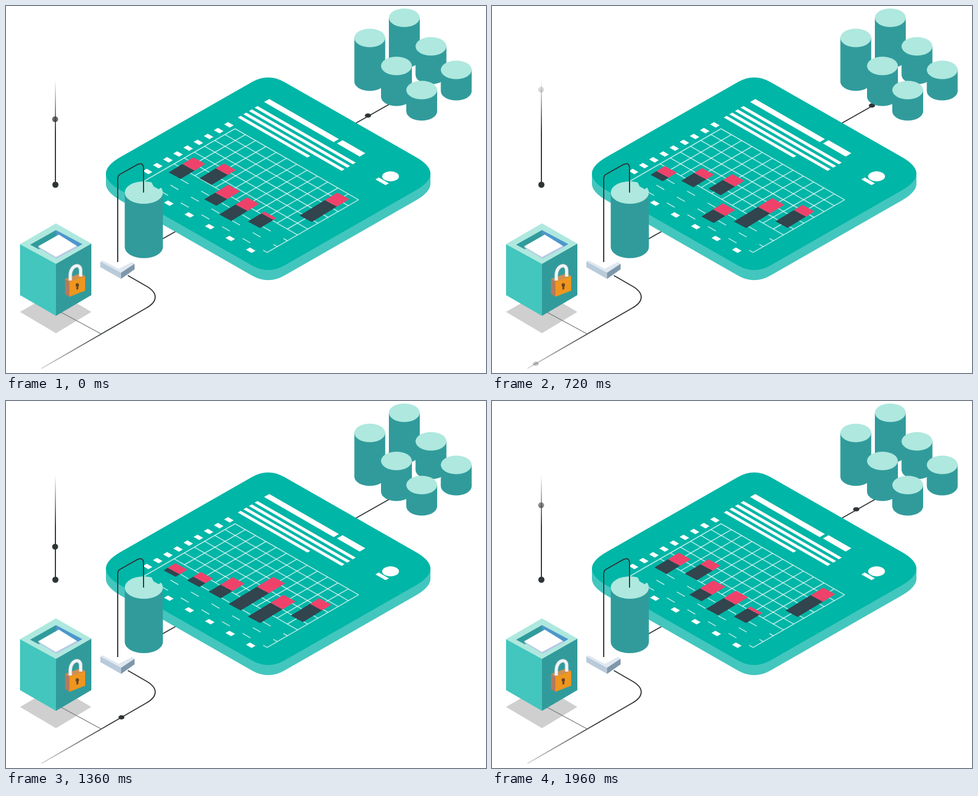
Recreate the animation shown at these times as an HTML page with a canvas. Size 855 px wide and 655 px high, loop 2000 ms.

```html
<!DOCTYPE html>
<html lang="en">
<head>
<meta charset="utf-8">
<title>Isometric data flow</title>
<style>
html, body { margin: 0; width: 100%; height: 100%; overflow: hidden; background: #fff; }
canvas { display: block; }
</style>
</head>
<body>
<canvas id="stage" width="855" height="655"></canvas>
<script>
const ctx = document.getElementById('stage').getContext('2d');
const LOOP = 2000, STEP = 40, K = 0.577;
const TEAL = '#00b6a7', MID = '#43c6be', DEEP = '#319b9c', PALE = '#aee8de';
const INK = '#2f3436', SLATE = '#32444d', PINK = '#ef426b';

function poly(fill, ...p) {
  ctx.beginPath();
  for (let i = 0; i < p.length; i += 2) ctx.lineTo(p[i], p[i + 1]);
  ctx.closePath();
  ctx.fillStyle = fill;
  ctx.fill();
}

function line(color, width, ...p) {
  ctx.beginPath();
  for (let i = 0; i < p.length; i += 2) ctx.lineTo(p[i], p[i + 1]);
  stroke(color, width);
}

function stroke(color, width) {
  ctx.strokeStyle = color;
  ctx.lineWidth = width;
  ctx.stroke();
}

function oval(fill, x, y, rx, ry) {
  ctx.beginPath();
  ctx.ellipse(x, y, rx, ry, 0, 0, 7);
  ctx.fillStyle = fill;
  ctx.fill();
}

// Parallelogram from its upper corner: u runs down-right, v down-left.
function tile(fill, x, y, u, v, ku = K, kv = K) {
  poly(fill, x, y, x + u, y + u * ku, x + u - v, y + u * ku + v * kv, x - v, y + v * kv);
}

function fade(x0, y0, a0, x1, y1) {
  const g = ctx.createLinearGradient(x0, y0, x1, y1);
  g.addColorStop(0, `rgba(47,52,54,${a0})`);
  g.addColorStop(1, INK);
  return g;
}

const dropInk = fade(88, 132, 0, 88, 225);
const pathInk = fade(63, 647, 0.2, 185, 577);

function cylinder(x, top, bottom, rx, ry) {
  ctx.beginPath();
  ctx.moveTo(x - rx, top);
  ctx.lineTo(x - rx, bottom);
  ctx.ellipse(x, bottom, rx, ry, 0, Math.PI, 0, true);
  ctx.lineTo(x + rx, top);
  ctx.fillStyle = DEEP;
  ctx.fill();
  oval(PALE, x, top, rx, ry);
}

function slabFace(fill, cy) {
  const cx = 467, w = 315, k = 0.572, h = w * k, d = 29, e = 52;
  ctx.beginPath();
  ctx.moveTo(cx - d, cy - h + d * k);
  ctx.quadraticCurveTo(cx, cy - h, cx + d, cy - h + d * k);
  ctx.lineTo(cx + w - e, cy - e * k);
  ctx.quadraticCurveTo(cx + w, cy, cx + w - e, cy + e * k);
  ctx.lineTo(cx + d, cy + h - d * k);
  ctx.quadraticCurveTo(cx, cy + h, cx - d, cy + h - d * k);
  ctx.lineTo(cx - w + e, cy + e * k);
  ctx.quadraticCurveTo(cx - w, cy, cx - w + e, cy - e * k);
  ctx.closePath();
  ctx.fillStyle = fill;
  ctx.fill();
}

const GX = 408, GY = 219, CU = 18.33, CV = 18.1;
const gx = (u, v) => GX + u - v;
const gy = (u, v) => GY + (u + v) * K;

function gridLine(u0, v0, u1, v1) {
  line('rgba(255,255,255,.75)', 1.5, gx(u0, v0), gy(u0, v0), gx(u1, v1), gy(u1, v1));
}

function slab() {
  for (let z = 18; z > 0; z -= 2) slabFace(MID, 299.3 + z);
  slabFace(TEAL, 299.3);

  tile('#fff', 469, 166, 124, 9.3);
  tile('#fff', 599.5, 239.5, 40.5, 10);
  for (let i = 0; i < 4; i++) tile('#fff', 448 - i * 10, 178.6 + i * 5.8, i < 3 ? 175 : 124, 5.2);
  oval('#fff', 685, 304, 15, 9);
  tile('#fff', 664, 306, 18, 6);

  for (let i = 0; i < 9; i++) tile('#fff', 395.5 - i * 18.1, 207.2 + i * 10.4, 10, 7);
  for (let i = 0; i < 5; i++) tile('#fff', 288.5 + i * 36.5, 347 + i * 21, 10, 7);

  const W = 12 * CU, H = 9 * CV;
  for (let r = 0; r <= 6; r++) gridLine(0, r * CV, W, r * CV);
  for (let c = 0; c <= 12; c++) gridLine(c * CU, 0, c * CU, c % 12 ? 6 * CV : H);
  for (let r = 7; r <= 9; r++) {
    for (let c = 2; c <= 12; c += 2) gridLine(c * CU - 7, r * CV, Math.min(W, c * CU + 7), r * CV);
  }
}

// Each edge of a bar swings as [middle x, swing], widest at the peak time.
const bars = [
  { peak: 100, foot: [284.5, 5.5], split: [299, 16], head: [315, 19.5] },
  { peak: 260, foot: [335.5, 13.5], split: [357, 24.5], head: [371, 25] },
  { peak: 760, foot: [367, 19], split: [389, 22.5], head: [409.5, 19] },
  { peak: 1440, foot: [382.5, 14.5], split: [415, 33], head: [437, 40] },
  { peak: 1000, foot: [431, 0], split: [466.5, 11.5], head: [484, 24] },
  { peak: 0, foot: [512, 11], split: [549.5, 18.5], head: [567.5, 22.5] }
];

function drawBars(t) {
  bars.forEach((bar, i) => {
    const wave = Math.cos((t - bar.peak) / LOOP * 2 * Math.PI);
    const [foot, split, head] = [bar.foot, bar.split, bar.head].map(([m, a]) => m + a * wave);
    const u = 9.3 + i * 2 * CU, rise = 0.61;
    const y = x => gy(u, gx(u, foot)) - 1 - (x - foot) * rise;
    tile(SLATE, split, y(split), 21.5, split - foot, 0.54, rise);
    tile(PINK, head, y(head), 21.5, head - split, 0.54, rise);
  });
}

function link(t) {
  line(INK, 2, 610, 216.5, 686, 173.5);
  line(INK, 2, 270, 420.5, 310, 398);
  const age = (t + 320) % 1000;
  if (age > 660) return;
  const x = 682 - 62 * (1 - (1 - age / 700) ** 1.5);
  oval(INK, x, 196 - (x - 644) * 0.56, 5.5, 3.8);
}

function vault() {
  poly('#cfcfcf', 25, 546, 89, 509, 152, 546, 89, 584);
  line('#70767a', 1.4, 97, 546, 169, 585);
  poly(MID, 25, 425, 89, 460, 89, 553, 25, 516);
  poly(DEEP, 89, 460, 152, 424, 152, 516, 89, 553);
  poly(PALE, 89, 388, 152, 424, 89, 460, 25, 425);
  poly(DEEP, 89, 400, 89, 428, 58, 434, 43, 426);
  poly('#4d97cc', 89, 400, 136, 425, 122, 433, 89, 414);
  poly('#b8c8e6', 57, 431, 96, 410, 129, 430, 90, 451);
  poly('#fff', 57, 429, 94, 408, 126, 428, 89, 448);
  padlock();
}

function padlock() {
  poly('#d08f52', 105, 487, 133, 477, 141, 482, 113, 493);
  ctx.beginPath();
  ctx.moveTo(114.5, 490);
  ctx.lineTo(114.5, 480);
  ctx.bezierCurveTo(115, 462, 133, 458, 133, 472);
  ctx.lineTo(133, 483);
  stroke('#c3cdd2', 6.5);
  stroke('#f2f5f6', 4.5);
  poly('#b5795c', 105, 487, 113, 492, 113, 519, 105, 514);
  poly('#ee961f', 113, 492, 141, 482, 141, 508, 113, 519);
  oval('#6b4520', 127, 498, 3, 3.3);
  poly('#6b4520', 125.5, 499, 128.5, 498, 129, 505, 125.5, 506.5);
}

const BEND = [250, 500, 271, 512, 271, 527, 250, 539];

function pathPoint(d) {
  if (d < 38) return [217 + 33 * d / 38, 481 + 19 * d / 38];
  if (d < 91) {
    const s = (d - 38) / 53, r = 1 - s;
    const w = [r * r * r, 3 * r * r * s, 3 * r * s * s, s * s * s];
    return [0, 1].map(k => w.reduce((sum, c, i) => sum + c * BEND[2 * i + k], 0));
  }
  const s = (d - 91) / 216;
  return [250 - 187 * s, 539 + 108 * s];
}

function route(t) {
  ctx.beginPath();
  ctx.moveTo(217, 481);
  ctx.lineTo(250, 500);
  ctx.bezierCurveTo(...BEND.slice(2));
  ctx.lineTo(63, 647);
  stroke(pathInk, 2);
  const d = ((t + 987) % 1000) * 0.41;
  if (d < 304) oval(pathInk, ...pathPoint(d), 5.3, 3.8);
}

function tray() {
  poly('#dfe8f0', 168, 456, 172, 454, 201, 469, 224, 457, 229, 460, 205, 476);
  poly('#b9cbda', 168, 456, 205, 476, 205, 487, 168, 466);
  poly('#7f97aa', 205, 476, 229, 460, 229, 470, 205, 487);
}

function tank() {
  cylinder(245.5, 333, 430, 34, 20);
  poly(TEAL, 258, 312, 282, 312, 280, 321, 272, 327, 263, 322);
  ctx.beginPath();
  ctx.moveTo(199, 457);
  ctx.lineTo(199, 308);
  ctx.quadraticCurveTo(199, 303, 203, 300.5);
  ctx.lineTo(234, 283);
  ctx.quadraticCurveTo(245, 278, 245, 290);
  ctx.lineTo(245, 333);
  stroke(INK, 2);
}

function drop(t) {
  ctx.fillStyle = dropInk;
  ctx.fillRect(87, 130, 2, 189);
  oval(INK, 88, 319, 5.5, 5.5);
  const phase = ((t + 352) % 1026) / 1026;
  oval(dropInk, 87.5, 141 + 178 * phase, 5.3, 5.3);
}

function cluster() {
  const cans = [[709.5, 21, 94], [648, 57, 135], [757, 72, 123],
    [695.5, 107, 162], [802, 114, 152], [740.5, 150, 188]];
  for (const can of cans) cylinder(...can, 27.5, 16.5);
}

function draw(now) {
  const t = Math.floor((now % LOOP) / STEP) * STEP;
  ctx.fillStyle = '#fff';
  ctx.fillRect(0, 0, 855, 655);
  link(t);
  slab();
  drawBars(t);
  cluster();
  vault();
  route(t);
  tray();
  tank();
  drop(t);
}

let start;
function tick(now) {
  if (start === undefined) start = now;
  draw(now - start);
  requestAnimationFrame(tick);
}
draw(0);
requestAnimationFrame(tick);
</script>
</body>
</html>
```
